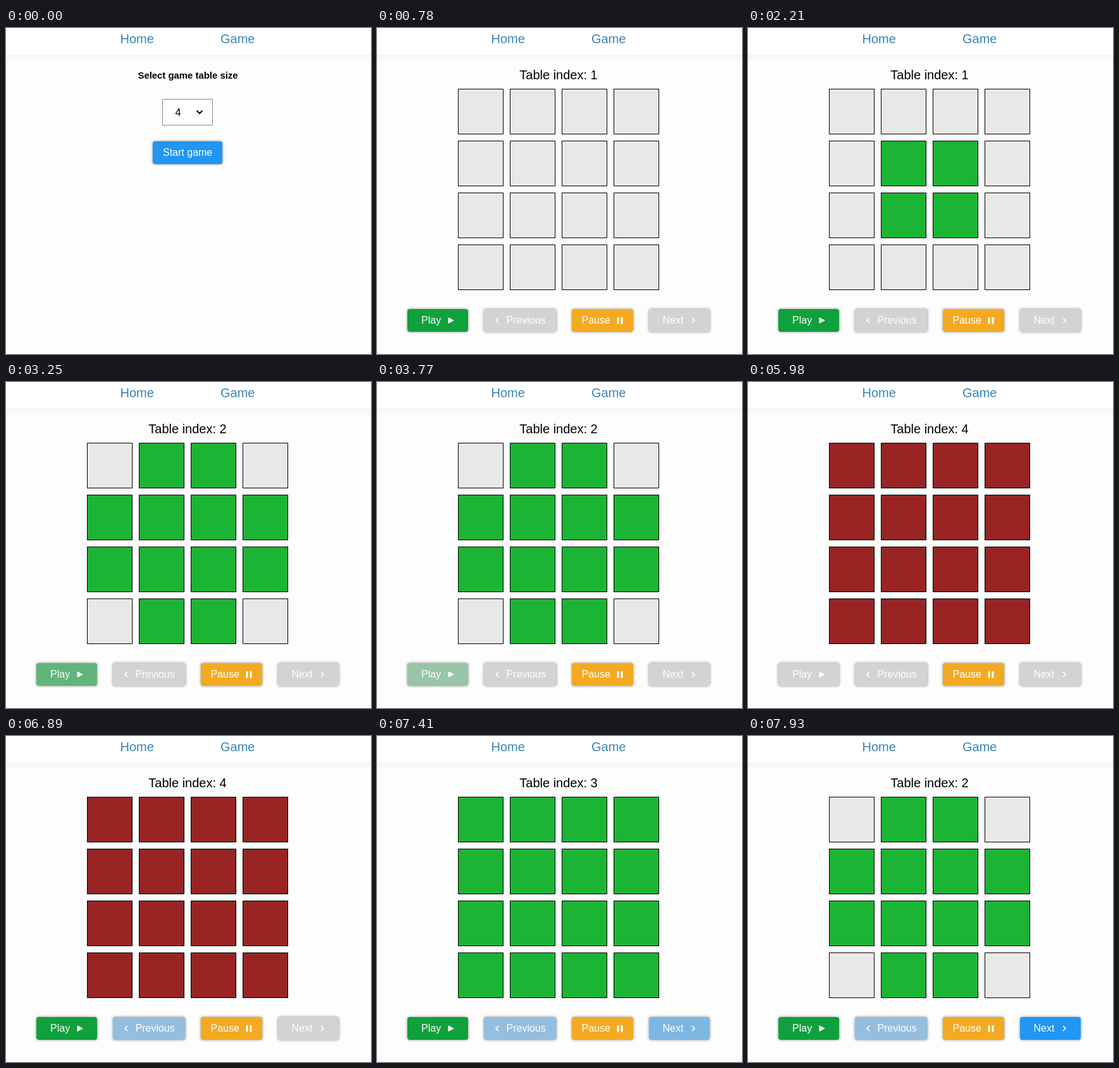
These frames come from a looping animation (577x515 px, 8000 ms). An HTML page:

```html
<!DOCTYPE html>
<html lang="en">
<head>
<meta charset="utf-8">
<style>
  html, body { margin: 0; width: 100%; height: 100%; overflow: hidden; background: #fdfdfd; }
  svg { display: block; width: 577px; height: 515px; font: 16px "Liberation Sans", Arial, sans-serif; }
  .big { font-size: 20px; }
  .nav { fill: #3885b5; }
  .button rect { filter: drop-shadow(0 0 2px rgba(0, 0, 0, .45)); }
  .button text, .solid { fill: #fff; }
  .line { fill: none; stroke: #fff; stroke-width: 1.7; }
  .cell { stroke: #000; }
</style>
</head>
<body>
<svg viewBox="0 0 577 515">
  <defs>
    <linearGradient id="shade" x2="0" y2="1">
      <stop stop-color="#f4f4f4"/><stop offset="1" stop-color="#fdfdfd"/>
    </linearGradient>
  </defs>
  <rect width="577" height="515" fill="#fdfdfd"/>
  <rect width="577" height="42" fill="#fff"/>
  <rect y="42" width="577" height="11" fill="url(#shade)"/>
  <g class="big nav">
    <text x="180.5" y="24">Home</text>
    <text x="339" y="24">Game</text>
  </g>

  <g id="setup">
    <text x="287.5" y="80" font-size="14.9" font-weight="bold" text-anchor="middle">Select game table size</text>
    <rect x="247.5" y="112.5" width="79" height="41" fill="#fff" stroke="#8c8c8c"/>
    <text x="267.5" y="139">4</text>
    <path d="M301.5 130.5l4.5 4.5 4.5-4.5" fill="none" stroke="#000" stroke-width="2"/>
    <g class="button">
      <rect x="232" y="179" width="110" height="36" rx="4" fill="#2196f3"/>
      <text x="248" y="202">Start game</text>
    </g>
  </g>

  <g id="game">
    <text id="title" class="big" x="287" y="81" text-anchor="middle"></text>
    <g id="cells"></g>
    <g class="button">
      <rect id="play" x="48" y="444" width="96" height="36" rx="4"/>
      <text x="70" y="467">Play</text>
      <path class="solid" d="M112.5 457l9.5 5-9.5 5z"/>
    </g>
    <g class="button">
      <rect id="previous" x="169" y="444" width="114.5" height="36" rx="4"/>
      <text x="204.5" y="467">Previous</text>
      <path class="line" d="M192 458l-4 4 4 4"/>
    </g>
    <g class="button">
      <rect x="308" y="444" width="97" height="36" rx="4" fill="#f3aa22"/>
      <text x="323.5" y="467">Pause</text>
      <path class="solid" d="M379.5 457h3v10.5h-3zM385.5 457h3v10.5h-3z"/>
    </g>
    <g class="button">
      <rect id="next" x="430" y="444" width="96" height="36" rx="4"/>
      <text x="451.5" y="467">Next</text>
      <path class="line" d="M498 458l4 4-4 4"/>
    </g>
  </g>
</svg>
<script>
const LOOP = 8000, SIZE = 4;
const GREY = [211, 211, 211], GREEN = [16, 160, 60], BLUE = [33, 150, 243];
const EMPTY = '#e8e8e8', ALIVE = '#1cb435', DONE = '#992424';

// [time, value] pairs
const TABLES = [[0, 1], [3120, 2], [4550, 3], [5980, 4], [7150, 3], [7670, 2]];
const CLICKS = { 5: 1300, 6: 1690, 10: 1950, 9: 2210 };
// How far each button has faded to grey
const FADES = {
  play: [GREEN, [[2900, 0], [3500, .7], [3770, .7], [4290, 1], [6200, 1], [6800, 0]]],
  previous: [BLUE, [[6200, 1], [6630, .45], [6890, .65]]],
  next: [BLUE, [[7100, 1], [7750, 0]]]
};

const el = id => document.getElementById(id);
const cells = Array.from({ length: SIZE * SIZE }, (_, i) => {
  const cell = document.createElementNS('http://www.w3.org/2000/svg', 'rect');
  const attrs = {
    class: 'cell', width: 71, height: 71,
    x: 128.5 + 82 * (i % SIZE), y: 96.5 + 82 * Math.floor(i / SIZE)
  };
  for (const name in attrs) cell.setAttribute(name, attrs[name]);
  return el('cells').appendChild(cell);
});

function ramp(keys, t) {
  const i = keys.findIndex(key => key[0] > t);
  if (i === 0) return keys[0][1];
  if (i < 0) return keys[keys.length - 1][1];
  const [t0, a] = keys[i - 1], [t1, b] = keys[i];
  return a + (b - a) * (t - t0) / (t1 - t0);
}

const mix = (a, b, k) => `rgb(${a.map((v, i) => Math.round(v + (b[i] - v) * k))})`;

function cellColor(i, table, t) {
  if (table === 1) return t >= CLICKS[i] ? ALIVE : EMPTY;
  const isCorner = [0, 3, 12, 15].includes(i);
  if (table === 2) return isCorner ? EMPTY : ALIVE;
  return table === 3 ? ALIVE : DONE;
}

function draw(now) {
  const t = now % LOOP, playing = t >= 650;
  el('setup').style.display = playing ? 'none' : '';
  el('game').style.display = playing ? '' : 'none';
  const table = TABLES.filter(([start]) => start <= t).pop()[1];
  el('title').textContent = `Table index: ${table}`;
  cells.forEach((cell, i) => cell.setAttribute('fill', cellColor(i, table, t)));
  for (const id in FADES) {
    const [color, keys] = FADES[id];
    el(id).setAttribute('fill', mix(color, GREY, ramp(keys, t)));
  }
  requestAnimationFrame(draw);
}
draw(0);
</script>
</body>
</html>
```
